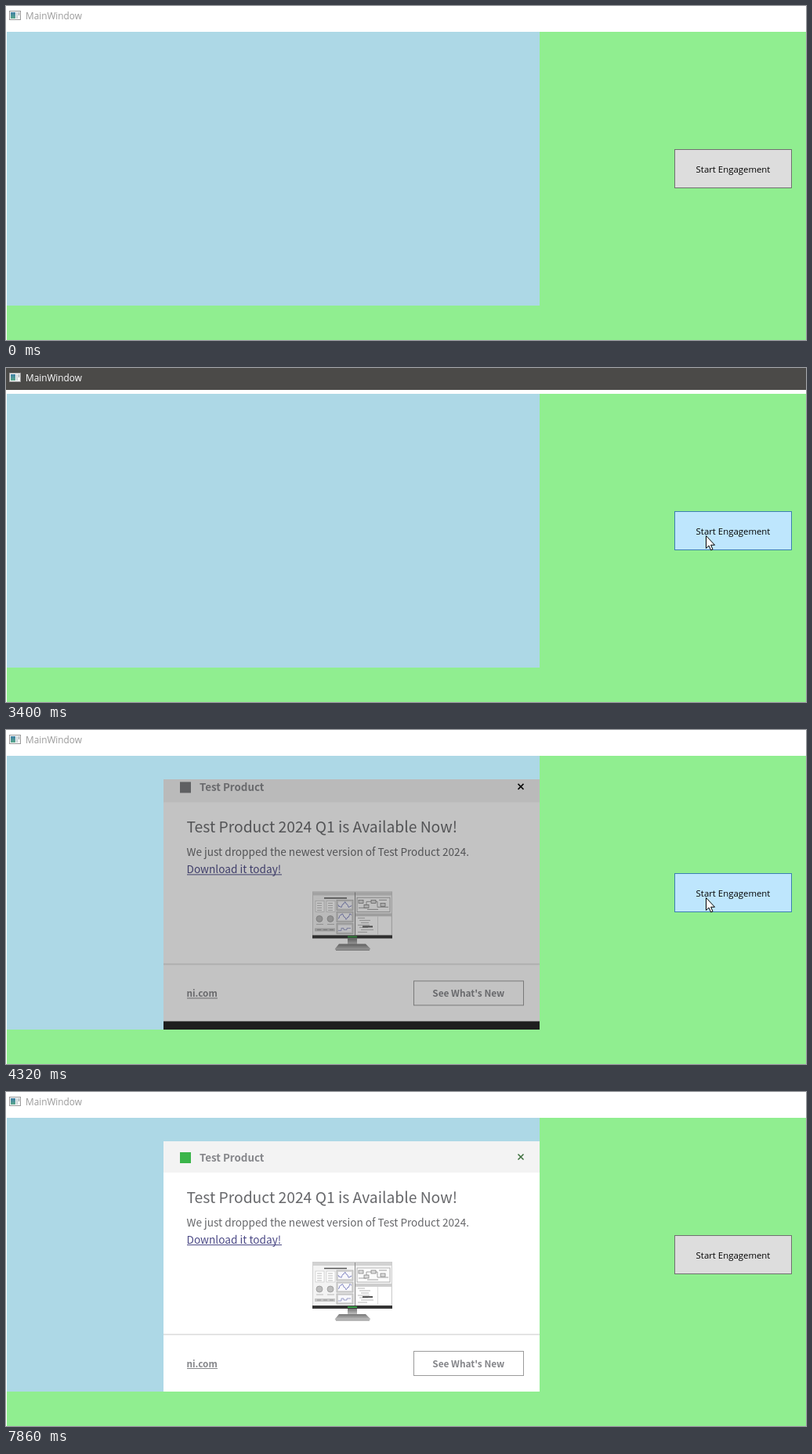
Write an HTML page that moves like this. It is 1021x427 px and loops after 8170 ms.

```html
<!DOCTYPE html>
<html lang="en">
<head>
<meta charset="utf-8">
<title>Popup engagement</title>
<style>
  html, body { margin: 0; width: 100%; height: 100%; overflow: hidden; background: #fff; }
  svg { display: block; width: 1021px; height: 427px; }
  .ui { font-family: "Open Sans", "Noto Sans", sans-serif; }
  .card { font-family: "Noto Sans CJK JP", "Noto Sans CJK SC", "Noto Sans CJK", "Noto Sans", sans-serif; }
  .light { font-weight: 300; }
  .semi { font-weight: 600; fill: #85868a; }
</style>
</head>
<body>
<svg viewBox="0 0 1021 427" xmlns="http://www.w3.org/2000/svg">
  <defs>
    <clipPath id="popupClip"><rect x="201" y="63" width="480" height="320"/></clipPath>
    <linearGradient id="metal" x2="0" y2="1">
      <stop offset="0" stop-color="#777"/><stop offset="1" stop-color="#c9c9c9"/>
    </linearGradient>
    <linearGradient id="teal" x2="0" y2="1">
      <stop offset="0" stop-color="#3f7fa6"/><stop offset="1" stop-color="#5aa88a"/>
    </linearGradient>
  </defs>

  <rect width="1021" height="427" fill="#fff"/>
  <rect id="titleBar" width="1021" height="28" fill="#4b4a48"/>
  <g>
    <rect x="4.5" y="6.5" width="14" height="11" fill="#f6f6f6" stroke="#9a9a9a"/>
    <rect x="6" y="8" width="6" height="8" fill="url(#teal)"/>
    <rect x="13" y="8" width="2" height="8" fill="#c9d3d8"/>
    <rect x="16" y="8" width="1" height="4" fill="#8f9ba0"/>
  </g>
  <text id="titleText" class="ui" x="25" y="17" font-size="11.8">MainWindow</text>
  <rect x="1" y="33" width="1020" height="394" fill="#90ee90"/>
  <rect x="1" y="33" width="680" height="350" fill="#add8e6"/>

  <g id="popup" clip-path="url(#popupClip)">
    <rect id="backdrop" x="201" y="63" width="480" height="320"/>
    <g id="card" class="card">
      <rect x="201" y="63" width="480" height="320" fill="#fff"/>
      <rect x="201" y="63" width="480" height="40" fill="#f3f3f3"/>
      <rect id="logo" x="222" y="77" width="14" height="14"/>
      <text class="semi" x="247" y="89" font-size="13.35">Test Product</text>
      <path id="close" d="M653.5 79.5l7 7m0-7l-7 7" fill="none" stroke-width="1.5"/>
      <text class="light" x="230.5" y="142" font-size="19.3" fill="#66676a">Test Product 2024 Q1 is Available Now!</text>
      <text class="light" x="230.5" y="172" font-size="13.6" fill="#66676a">We just dropped the newest version of Test Product 2024.</text>
      <text class="light" x="230.5" y="194" font-size="13.65" fill="#4c4a86">Download it today!</text>
      <rect x="231" y="195" width="121" height="1" fill="#4c4a86"/>
      <g id="monitor"></g>
      <rect x="201" y="309" width="480" height="2" fill="#e4e4e4"/>
      <text class="semi" x="230.5" y="352" font-size="11.75">ni.com</text>
      <rect x="231" y="353" width="39" height="1" fill="#85868a"/>
      <rect x="520.5" y="331.5" width="140" height="31" fill="none" stroke="#9b9b9b"/>
      <text class="semi" x="590.3" y="352" font-size="11.85" text-anchor="middle">See What's New</text>
    </g>
  </g>

  <rect id="button" x="853.5" y="183.5" width="149" height="49"/>
  <text class="ui" x="928" y="213" font-size="11.4" text-anchor="middle">Start Engagement</text>
  <g id="ring" fill="none" stroke-width="3">
    <circle cx="907.5" cy="214.5" r="6.5" stroke="#1b8fcb"/>
    <path id="glint" d="M907.5 208a6.5 6.5 0 0 1 6.5 6.5" stroke="#8fdcf8"/>
  </g>
  <path id="cursor" d="M.5 .5V16.5L4.1 13.2 6.6 18.9 9 17.9 6.6 12.3H11.5Z" fill="#fff" stroke="#000"/>
</svg>
<script>
const LOOP = 8170;
const $ = id => document.getElementById(id);
const el = (id, attrs) => {
  for (const k in attrs) $(id).setAttribute(k, attrs[k]);
};
const show = (id, on) => el(id, { visibility: on ? "visible" : "hidden" });

const box = (x, y, w, h, fill, stroke = "none") =>
  `<rect x="${x}" y="${y}" width="${w}" height="${h}" fill="${fill}" stroke="${stroke}" stroke-width=".7"/>`;
const line = (d, stroke, width = .8) =>
  `<path d="${d}" fill="none" stroke="${stroke}" stroke-width="${width}"/>`;

function wave(x, y, phase) {
  let d = "";
  for (let i = 0; i <= 17; i++)
    d += `${i ? "L" : "M"}${x + i} ${(y + 3 * Math.sin(i * .55 + phase) + Math.sin(i * 2)).toFixed(1)}`;
  return line(d, "#6a6fb5");
}

function drawMonitor() {
  let s = box(391, 217, 102, 60, "#cfcfcf") + box(392, 218, 100, 55, "#f3f3f3");
  s += box(392, 218, 53, 4, "#d2d2d2") + box(446, 218, 46, 4, "#d2d2d2") + box(445, 218, 1, 55, "#8c8c8c");
  s += line("M406 225.5h29", "#555", 1.5);
  for (const x of [395, 409]) {
    s += box(x, 229, 11, 14, "#fff", "#c5c5c5");
    for (let y = 232; y < 242; y += 3) s += line(`M${x + 2} ${y}h${5 + y % 3}`, "#aaa");
    s += `<circle cx="${x + 5}" cy="252" r="4" fill="#bdbdbd" stroke="#888" stroke-width=".6"/>`;
    s += line(`M${x + 1} 259h9`, "#aaa");
  }
  for (let i = 0; i < 3; i++) {
    const y = 228 + i * 15;
    s += box(422, y, 21, 13, "#d6d6d6", "#aaa") + box(424, y + 2, 17, 9, "#f8f8fb");
    if (i < 2) s += wave(424, y + 6, i * 2.2);
    else s += line("M424 267h4v-3h3v2h4v-2h5", "#8588bb");
  }
  s += box(394, 264, 26, 4, "#c4c4c4");
  for (let x = 397; x < 419; x += 8) s += line(`M${x} 266h5`, "#888");
  s += box(448, 225, 42, 18, "#fbfbfb", "#999");
  s += line("M450 238h10v-8h14v7h14M461 240h14M476 228h10", "#8b8b8b");
  for (const [x, y] of [[450, 228], [457, 234], [466, 228], [478, 232]]) s += box(x, y, 6, 4, "#ddd", "#777");
  s += box(446, 245, 46, 4, "#cdcdcd") + box(447, 249, 44, 23, "#fff");
  for (let i = 0; i < 7; i++) s += line(`M${449 + i % 3 * 2} ${251 + i * 3}h${9 + i * 5 % 9}`, "#a5a5a5");
  s += box(455, 261, 13, 2, "#555") + box(474, 249, 1, 23, "#ddd");
  s += box(391, 273, 102, 4, "#343434") + box(436, 274, 12, 2, "#3b9f49");
  s += box(436, 277, 12, 8, "url(#metal)");
  s += '<path d="M425 284h34l6 6q0 2-4 2h-38q-4 0-3-2z" fill="url(#metal)"/>' + line("M421 292h43", "#777");
  $("monitor").innerHTML = s;
}

const tick = d => Math.floor(d / 150) * 150 + (d % 150 >= 60 ? 60 : 0);
const clamp = v => Math.max(0, Math.min(1, v));

function cursorAt(t) {
  if (t < 310 || t >= 7860) return null;
  if (t < 670) {
    const k = (1 - tick(t - 310) / 360) ** 2;
    return [893 + 30 * k, 214 + 198 * k];
  }
  if (t < 7320) return [893, 214];
  const k = ((Math.min(tick(t - 7320), 450) + 30) / 480) ** 1.6;
  return [893 + 30 * k, 214 + 204 * k];
}

function buttonLook(t, pos) {
  if (!pos || pos[1] >= 233) return ["#dddddd", "#707070"];
  if (t >= 1140 && t < 1540) return ["#c4e5f6", "#2c628b"];
  if (t >= 1540 && t < 1600) return ["#c1e6fa", "#34719e"];
  return ["#bee6fd", "#3c7fb1"];
}

function slideAt(t) {
  if (t < 4170) return 0;
  if (t >= 4620) return 1;
  return 1 - (1 - clamp((4170 + tick(t - 4170) - 4144) / 492)) ** 3;
}

function render(t) {
  const active = t >= 1140 && t < 3860;
  show("titleBar", active);
  el("titleText", { fill: active ? "#fff" : "#999" });

  const pos = cursorAt(t);
  show("cursor", pos);
  if (pos) el("cursor", { transform: `translate(${pos.map(Math.round)})` });
  const [fill, stroke] = buttonLook(t, pos);
  el("button", { fill, stroke });

  show("ring", t >= 3000 && t < 3400);
  const turn = t < 3150 ? 0 : t < 3340 ? 120 : 240;
  el("glint", { transform: `rotate(${turn} 907.5 214.5)` });

  show("popup", t >= 3860);
  const p = slideAt(t), shade = Math.round(41 * p), settled = p > .9;
  el("backdrop", { fill: `rgb(${shade},${shade},${shade})` });
  el("card", { opacity: p, transform: `translate(0 ${-40 * (1 - p)})` });
  el("logo", { fill: settled ? "#3bb54a" : "#77787b" });
  el("close", { stroke: settled ? "#3c6e3c" : "#000" });
}

drawMonitor();
const start = performance.now();
function frame() {
  render((performance.now() - start) % LOOP);
  requestAnimationFrame(frame);
}
frame();
</script>
</body>
</html>
```
